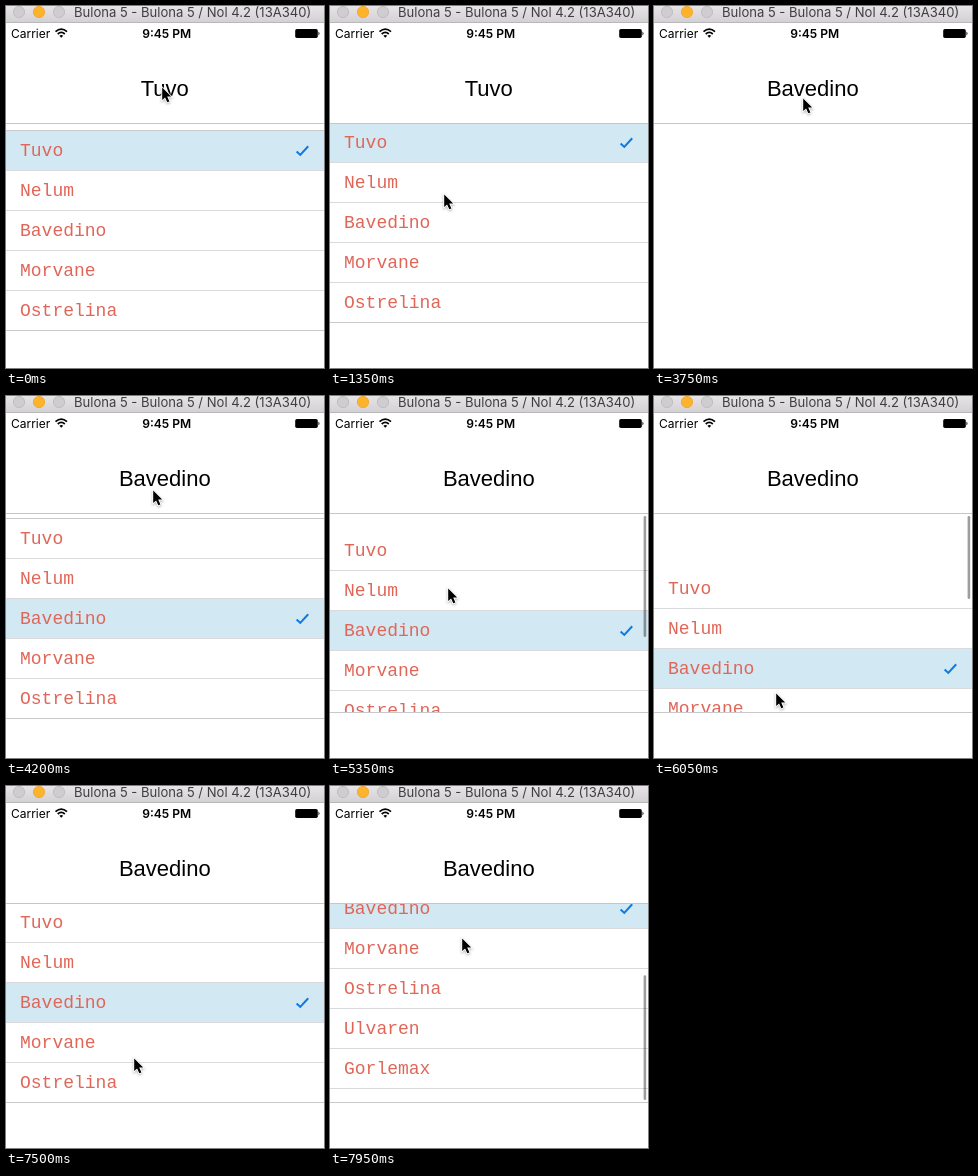
These frames come from a looping animation (318x362 px, 8000 ms). An HTML page:

```html
<!DOCTYPE html>
<html lang="en">
<head>
<meta charset="utf-8">
<title>Dropdown menu</title>
<style>
html, body { margin: 0; width: 100%; height: 100%; overflow: hidden; background: #fff; }
svg { display: block; width: 100%; height: 100%; }
.ui { font-family: Inter, Roboto, sans-serif; }
.title { font: 22px "Liberation Sans", Arial, sans-serif; text-anchor: middle; }
.row { font: 18px "Liberation Mono", "Courier New", monospace; fill: #e06658; }
#cursor { filter: drop-shadow(0 1px 1px rgba(0, 0, 0, .3)); }
</style>
</head>
<body>
<svg viewBox="0 0 318 362" xmlns="http://www.w3.org/2000/svg">
  <defs>
    <linearGradient id="bar" x2="0" y2="1">
      <stop offset="0" stop-color="#e6e4e6"/>
      <stop offset="1" stop-color="#d3d1d3"/>
    </linearGradient>
    <clipPath id="below"><rect y="117" width="318" height="245"/></clipPath>
    <clipPath id="frame"><rect y="116" width="318" height="201"/></clipPath>
  </defs>
  <rect width="318" height="362" fill="#fff"/>

  <rect width="318" height="16" fill="url(#bar)"/>
  <rect y="16" width="318" height="1" fill="#b9b7b9"/>
  <g stroke="#bfbdbf" fill="#cfcdcf">
    <circle cx="13" cy="6" r="5.6"/>
    <circle cx="33" cy="6" r="5.6" fill="#fdb32b" stroke="#f0a934"/>
    <circle cx="53" cy="6" r="5.6"/>
  </g>
  <text class="ui" x="68" y="11" font-size="13.05" fill="#403e40">Bulona 5 - Bulona 5 / Nol 4.2 (13A340)</text>

  <text class="ui" x="5" y="31.5" font-size="12">Carrier</text>
  <g fill="none" stroke="#000" stroke-width="1.7">
    <path d="M49.5 25.6Q55.3 20.6 61 25.6M51.7 28Q55.3 24.9 58.8 28"/>
    <path d="M55.3 31.8L53.4 29.7Q55.3 28.2 57.2 29.7Z" fill="#000" stroke="none"/>
  </g>
  <text class="ui" x="160.7" y="31.5" font-size="12.1" font-weight="600" text-anchor="middle">9:45 PM</text>
  <rect x="289.2" y="23" width="22.6" height="9" rx="1.8"/>
  <path d="M312.5 25.5Q314.5 27.5 312.5 29.5Z"/>

  <text class="title" id="title" x="158.8" y="89.6"></text>

  <g clip-path="url(#below)">
    <g id="table">
      <g clip-path="url(#frame)">
        <rect y="116" width="318" height="201" fill="#fff"/>
        <g id="rows">
          <rect id="mark" y="117" width="318" height="39" fill="#d2e8f3"/>
          <path id="check" d="M290.6 137.4L294.3 140.9L302.2 132.3" fill="none" stroke="#0c7ae6" stroke-width="2"/>
        </g>
      </g>
      <g fill="#c9c9cb">
        <rect y="116" width="318" height="1"/>
        <rect y="316" width="318" height="1"/>
      </g>
      <rect id="thumb" x="313.6" width="2.6" rx="1.3" fill="#000"/>
    </g>
  </g>
  <rect y="117" width="318" height="1" fill="#c6c6c8"/>

  <path id="cursor" d="M1.2 1.6V14l2.9-2.6 2.2 4.9 2.1-.9-2.2-4.8h4z" stroke="#fff" stroke-width="1.8" paint-order="stroke"/>
</svg>
<script>
const LOOP = 8000, STEP = 50, PAGE = 200, ROW = 40;
const NAMES = ["Tuvo", "Nelum", "Bavedino", "Morvane", "Ostrelina", "Ulvaren", "Gorlemax"];
const MAX = NAMES.length * ROW - PAGE;
const PICK = 2450, REOPEN = 3800, DRAG = 5065, RELEASE = 6350, FLING = 7650;

// pointer moves: start, end, x, y
const HOME = { x: 155, y: 80 };
const MOVES = [
  [400, 850, 117, 185], [1250, 1350, 113, 187],
  [1450, 1800, 96, 202], [1800, 2100, 106, 211],
  [2850, 3400, 150, 89], [3700, 3800, 146, 93],
  [4250, 4700, 116, 146], [DRAG, 5850, 121, 296],
  [6700, 7150, 127, 271], [FLING, 7950, 131, 151]
];

const $ = id => document.getElementById(id);
const clamp = (v, a = 0, b = 1) => Math.min(b, Math.max(a, v));
const smooth = p => p * p * (3 - 2 * p);
const moveY = (el, y) => el.setAttribute("transform", `translate(0 ${Math.round(y)})`);

function pointer(t) {
  let { x, y } = HOME;
  for (const [from, to, nx, ny] of MOVES) {
    const p = smooth(clamp((t - from) / (to - from)));
    x += (nx - x) * p;
    y += (ny - y) * p;
  }
  return { x, y };
}

// underdamped drop from 500 px above
function spring(ms) {
  const u = ms * 0.01178, k = 0.92;
  const y = -500 * Math.exp(-k * u) * (Math.cos(u) + k * Math.sin(u));
  return u > Math.PI ? Math.max(0, y) : Math.max(-PAGE, y);
}

function tableY(t) {
  if (t < PICK) return spring(t + 387);
  if (t > REOPEN) return spring(t - REOPEN);
  return -PAGE * Math.sin(Math.PI / 2 * clamp((t - PICK) / 297));
}

// resistance past the ends of the list
function rubber(d) {
  const r = 0.55 * Math.max(0, d) / PAGE;
  return PAGE * r / (1 + r);
}

function scrollY(t) {
  if (t < DRAG) return 0;
  if (t <= FLING) {
    const s = Math.max(0, t - RELEASE) / 1000 * 12.4;
    const pull = rubber(pointer(Math.min(t, RELEASE)).y - 155);
    return pull * (1 + s) * Math.exp(-s);
  }
  const d = Math.max(0, 259 - pointer(t).y);
  return -Math.min(d, MAX) - rubber(d - MAX);
}

function thumbAlpha(t) {
  const shown = clamp((t - DRAG) / 100) * clamp((7150 - t) / 200);
  return 0.38 * Math.max(shown, clamp((t - FLING) / 50));
}

function add(tag, attrs, text = "") {
  const el = document.createElementNS("http://www.w3.org/2000/svg", tag);
  for (const k in attrs) el.setAttribute(k, attrs[k]);
  el.textContent = text;
  $("rows").appendChild(el);
}

NAMES.forEach((name, i) => {
  const y = 116 + i * ROW;
  add("text", { class: "row", x: 14, y: y + 26 }, name);
  add("rect", { y: y + ROW, width: 318, height: 1, fill: "#dadadc" });
});

function drawThumb(t, scroll) {
  const over = Math.max(0, scroll, -scroll - MAX);
  const end = clamp(-scroll / MAX);
  const top = 120 + 55 * end + over * end;
  const thumb = $("thumb");
  thumb.setAttribute("y", top);
  thumb.setAttribute("height", 139 - over);
  thumb.setAttribute("opacity", thumbAlpha(t));
}

function draw(t) {
  const pick = t < PICK ? 0 : 2;
  $("title").textContent = NAMES[pick];
  moveY($("mark"), pick * ROW);
  moveY($("check"), pick * ROW);
  moveY($("table"), tableY(t));

  const scroll = scrollY(t);
  moveY($("rows"), scroll);
  drawThumb(t, scroll);

  const { x, y } = pointer(t);
  $("cursor").setAttribute("transform", `translate(${Math.round(x)} ${Math.round(y)})`);
}

const start = performance.now();
function tick() {
  const t = (performance.now() - start) % LOOP;
  draw(Math.floor(t / STEP) * STEP);
  requestAnimationFrame(tick);
}
tick();
</script>
</body>
</html>
```
